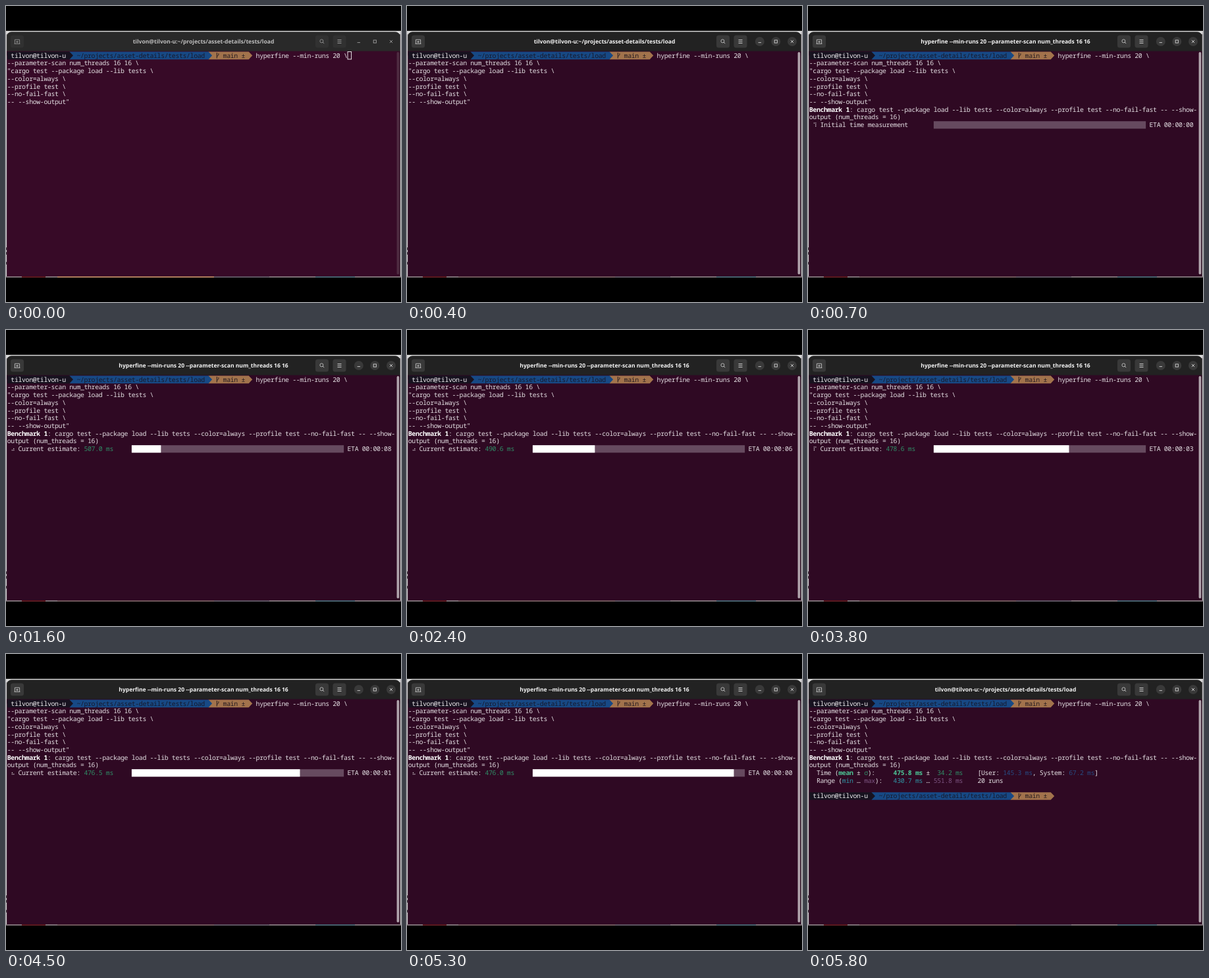
Animation, 600 px wide and 450 px high, one loop 6.1 s. Source, as an HTML page with a canvas:

```html
<!DOCTYPE html>
<html lang="en">
<head>
<meta charset="utf-8">
<title>Benchmark in a terminal</title>
<style>
  html, body { margin: 0; width: 100%; height: 100%; overflow: hidden; background: #000; }
  canvas { display: block; width: 600px; height: 450px; }
</style>
</head>
<body>
<canvas id="stage" width="600" height="450"></canvas>
<script>
const ctx = document.getElementById('stage').getContext('2d');
ctx.textRendering = 'geometricPrecision';

const LOOP = 6100, STEP = 100;
const CELL = 5.556, LINE = 11.72, LEFT = 2, TOP = 69.5;
const MONO = '9.9px "Noto Sans Mono", "DejaVu Sans Mono", monospace';
const SANS = 'bold 8.55px "Open Sans", "Noto Sans", sans-serif';

const USER = 'tilvon', HOST = 'tilvon-u';
const PATH = '~/projects/asset-details/tests/load';
const HOME_TITLE = `${USER}@${HOST}:${PATH}`;
const RUN_TITLE = 'hyperfine --min-runs 20 --parameter-scan num_threads 16 16';

const C = {
  text: '#e4dfe3', white: '#ffffff', black: '#17121f', green: '#2f8d66', lime: '#4cc394',
  blue: '#174985', navy: '#274b82', cyan: '#2f93a4', purple: '#7d5582', tan: '#a2734c', track: '#664a5f'
};

// Times in ms
const CURSOR_OFF = 400, START = 700, RUN_ZERO = 900, RUN = 222;
const DONE = 5400, TITLE_BACK = 5500, PROMPT = 5600, BLINK = 5800;

const RUNS = 20, BAR_COL = 34, BAR_CELLS = 58;
const means = [551.8, 524.6, 507.0, 499.2, 494.3, 490.6, 487.7, 485.2, 483.4, 481.9,
  480.6, 479.5, 478.6, 477.8, 477.1, 476.5, 476.3, 476.1, 476.0];

// Lit braille dots: 1-3 left column, 4-6 right column
const spinner = ['124', '145', '1456', '456', '3456', '356', '236', '1236', '123', '1234'];

const colX = col => LEFT + col * CELL;
const rowY = row => TOP + row * LINE;
const mix = (a, b, f) => `rgb(${a.map((v, i) => Math.round(v + (b[i] - v) * f)).join()})`;

function rect(x, y, w, h, color) {
  ctx.fillStyle = color;
  ctx.fillRect(x, y, w, h);
}

function round(x, y, w, h, r, color) {
  ctx.fillStyle = color;
  ctx.beginPath();
  ctx.roundRect(x, y, w, h, r);
  ctx.fill();
}

function dot(x, y, r, color) {
  ctx.fillStyle = color;
  ctx.beginPath();
  ctx.arc(x, y, r, 0, 7);
  ctx.fill();
}

function stroke(color, width, ...lines) {
  ctx.strokeStyle = color;
  ctx.lineWidth = width;
  ctx.beginPath();
  for (const [x, y, ...rest] of lines) {
    ctx.moveTo(x, y);
    for (let i = 0; i < rest.length; i += 2) ctx.lineTo(rest[i], rest[i + 1]);
  }
  ctx.stroke();
}

// Writes [text, color, bold] runs, each letter centred in its grid cell
function write(row, col, ...runs) {
  ctx.textAlign = 'center';
  for (const [text, color = C.text, bold] of runs) {
    ctx.font = (bold ? 'bold ' : '') + MONO;
    ctx.fillStyle = color;
    for (const ch of text) {
      if (ch !== ' ') ctx.fillText(ch, colX(col + 0.5), rowY(row) + 9.2);
      col++;
    }
  }
}

function segment(row, from, to, color) {
  const x = colX(from), end = colX(to), y = rowY(row);
  ctx.fillStyle = color;
  ctx.beginPath();
  ctx.moveTo(x, y);
  ctx.lineTo(end, y);
  ctx.lineTo(end + CELL, y + LINE / 2);
  ctx.lineTo(end, y + LINE);
  ctx.lineTo(x, y + LINE);
  ctx.fill();
}

function prompt(row) {
  segment(row, 55, 66, C.tan);
  segment(row, 17, 55, C.blue);
  segment(row, 0, 17, C.black);
  write(row, 1, [`${USER}@${HOST}`, '#f0edf0']);
  write(row, 19, [PATH, '#17192b']);
  write(row, 59, ['main ±', '#241a20']);
  const x = colX(57), y = rowY(row);
  stroke('#241a20', 1, [x + 1.6, y + 1.5, x + 1.6, y + 10], [x + 1.6, y + 7.5, x + 4.2, y + 5, x + 4.2, y + 2.5]);
}

function cursor(row, col, hollow) {
  const x = colX(col), y = rowY(row);
  if (hollow) {
    ctx.strokeStyle = C.text;
    ctx.lineWidth = 1;
    ctx.strokeRect(x + 0.3, y, CELL, LINE - 0.3);
  } else {
    rect(x, y, CELL, LINE, C.text);
  }
}

function desktop(focus) {
  rect(0, 0, 600, 450, '#000');
  rect(0, 37.8, 600, 5, '#dedede');
  rect(0, 39, 1.5, 373, '#d6d3d6');
  rect(598.6, 39, 1.4, 373, '#c4c0c4');
  for (const y of [367, 374, 389]) rect(0, y, 1.5, 4, '#443c44');
  rect(0, 411, 600, 1.8, '#877a80');
  rect(24, 411, 36, 1.8, '#5b1218');
  rect(78, 411, 238, 1.8, mix([181, 127, 91], [110, 84, 88], focus));
  rect(316, 411, 84, 1.8, '#5b5260');
  rect(470, 411, 60, 1.8, '#41606e');
}

function header(title, focus) {
  const fg = mix([190, 190, 190], [245, 245, 245], focus);
  const icon = mix([160, 160, 160], [212, 212, 212], focus);
  const button = mix([49, 49, 49], [57, 57, 57], focus);
  round(1.3, 39.3, 597, 36, [7, 7, 0, 0], mix([41, 41, 41], [34, 34, 34], focus));
  for (const x of [7, 470, 496.5]) round(x, 44.5, 20, 19, 3.5, button);

  // New tab, search, menu
  stroke(icon, 0.8, [13.4, 57.4, 13.4, 51.2, 20.6, 51.2, 20.6, 57.4], [12.6, 57.4, 21.4, 57.4],
    [17, 52.8, 17, 56.4], [15.2, 54.6, 18.8, 54.6]);
  ctx.beginPath();
  ctx.arc(479.4, 53.3, 2.5, 0, 7);
  ctx.stroke();
  stroke(icon, 0.9, [481.2, 55.1, 483.2, 57.1]);
  stroke(icon, 0.9, [503.5, 51.5, 509.5, 51.5], [503.5, 54, 509.5, 54], [503.5, 56.5, 509.5, 56.5]);

  // Window controls
  ctx.globalAlpha = focus;
  for (const x of [535.8, 560.3, 585]) dot(x, 54, 7, button);
  ctx.globalAlpha = 1;
  stroke(icon, 0.9, [533.6, 55.6, 538, 55.6]);
  ctx.strokeRect(558.2, 51.9, 4.2, 4.2);
  stroke(icon, 0.9, [582.9, 51.9, 587.1, 56.1], [587.1, 51.9, 582.9, 56.1]);

  ctx.font = SANS;
  ctx.textAlign = 'center';
  ctx.fillStyle = fg;
  ctx.fillText(title, 300, 57);
}

function progress(t) {
  const n = (t - START) / STEP;
  const k = Math.max(0, Math.min(RUNS - 1, Math.floor((t - RUN_ZERO) / RUN)));
  const tick = Math.floor(n * 2.44 + (k ? 4.02 : 2.02)) % spinner.length;
  const x = colX(1), y = rowY(9);
  for (const d of spinner[tick]) {
    dot(x + (d > 3 ? 4.2 : 1.9), y + 3.1 + (d - 1) % 3 * 2.3, 0.75, C.text);
  }
  if (k) write(9, 3, ['Current estimate: '], [means[k - 1].toFixed(1) + ' ms', C.green]);
  else write(9, 3, ['Initial time measurement']);

  const done = Math.floor(BAR_CELLS * k / RUNS);
  rect(colX(BAR_COL), y + 0.2, BAR_CELLS * CELL, LINE - 0.4, C.track);
  rect(colX(BAR_COL), y + 0.2, done * CELL, LINE - 0.4, C.white);
  const eta = k ? Math.floor((RUNS - k) * 0.48) : 0;
  write(9, 93, ['ETA 00:00:' + String(eta).padStart(2, '0')]);
}

function results() {
  write(9, 2, ['Time ('], ['mean', C.lime, true], [' ± '], ['σ', C.green], ['):     '],
    ['475.8 ms', C.lime, true], [' ±  '], ['34.2 ms', C.green], ['    [User: '],
    ['145.3 ms', C.navy], [', System: '], ['67.2 ms', C.navy], [']']);
  write(10, 2, ['Range ('], ['min', C.cyan], [' … '], ['max', C.purple], ['):   '],
    ['430.7 ms', C.cyan], [' … '], ['551.8 ms', C.purple], ['    20 runs']);
}

function draw(t) {
  const focus = Math.min(1, t / 200);
  const running = t >= START;
  desktop(focus);
  header(running && t < TITLE_BACK ? RUN_TITLE : HOME_TITLE, focus);
  rect(1.3, 68.6, 597, 342.4, mix([55, 10, 39], [47, 9, 35], focus));
  round(593.6, 70, 3.6, 338, 1.8, mix([78, 44, 65], [176, 164, 172], focus));

  prompt(0);
  write(0, 68, ['hyperfine --min-runs 20 \\']);
  ['--parameter-scan num_threads 16 16 \\',
    '"cargo test --package load --lib tests \\',
    '--color=always \\',
    '--profile test \\',
    '--no-fail-fast \\',
    '-- --show-output"'].forEach((line, i) => write(i + 1, 0, [line]));
  if (t < CURSOR_OFF) cursor(0, 93, t < STEP);
  if (!running) return;

  write(7, 0, ['Benchmark 1', C.white, true],
    [': cargo test --package load --lib tests --color=always --profile test --no-fail-fast -- --show-']);
  write(8, 0, ['output (num_threads = 16)']);
  if (t < DONE) return progress(t);
  results();
  if (t < PROMPT) return;
  prompt(12);
  if (t < BLINK) cursor(12, 68);
}

const begin = performance.now();
function loop() {
  const t = (performance.now() - begin) % LOOP;
  draw(Math.floor(t / STEP) * STEP);
  requestAnimationFrame(loop);
}
loop();
</script>
</body>
</html>
```
